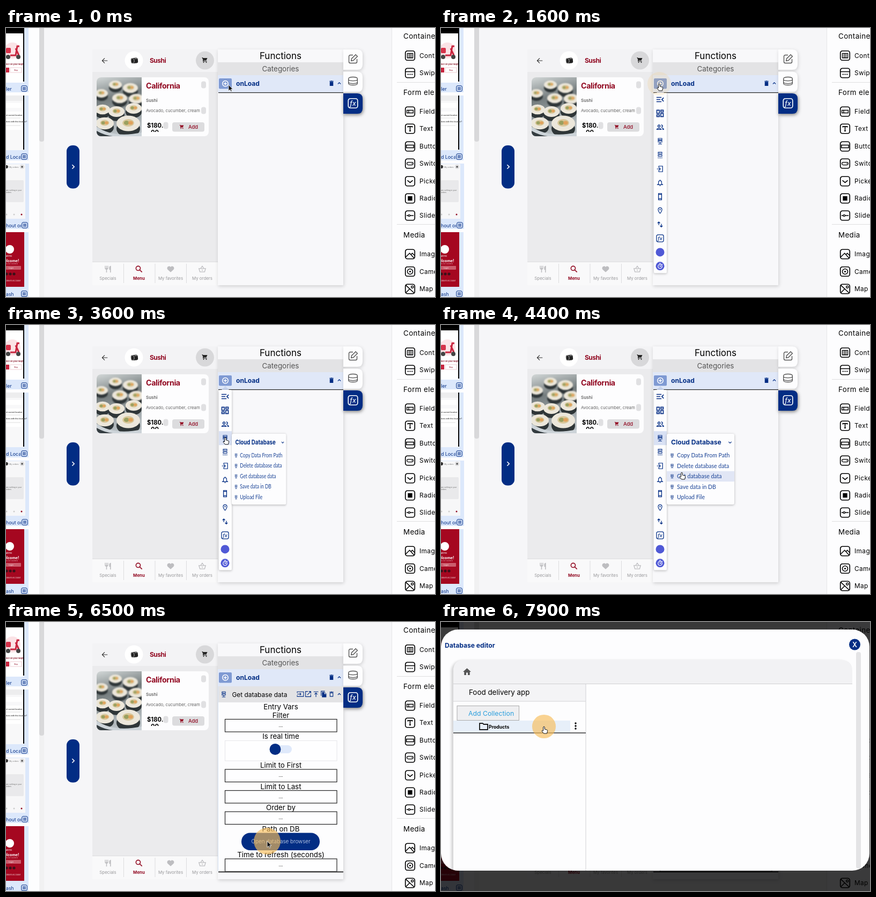
An HTML page for the animation above (8 s loop, 800 px wide and 502 px high).

```html
<!DOCTYPE html>
<html lang="en">
<head>
<meta charset="utf-8">
<title>Function editor</title>
<style>
html, body { margin: 0; width: 100%; height: 100%; overflow: hidden; background: #f6f6f8; }
svg { display: block; font-family: Inter, "Open Sans", sans-serif; }
.soft { filter: drop-shadow(0 1px 2px rgba(0,0,0,.28)); }
.side { filter: drop-shadow(1px 2px 3px rgba(0,0,0,.16)); }
.deep { filter: drop-shadow(1px 2px 3px rgba(0,0,0,.5)); }
.left { filter: drop-shadow(-4px 1px 2px rgba(0,0,0,.16)); }
.blur { filter: blur(1px); }
</style>
</head>
<body>
<svg id="stage" width="800" height="502" viewBox="0 0 800 502"></svg>
<script>
const NAVY = '#022d84', RED = '#920a22', INK = '#000', GREY = '#bdbdc0';
const LOOP = 8000;

// 24-unit icons: [path, stroke width]; no width means filled
const ICON = {
  back: ['M21 12H4M12 4l-8 8 8 8', 2],
  trash: ['M6 7h12v14H6zM5 4h4l1-1h4l1 1h4v2H5z'],
  bin: ['M7 8h10v12H7zM5 5h14M10 4h4', 2],
  up: ['M5 16l7-7 7 7', 3],
  down: ['M5 9l7 7 7-7', 3],
  right: ['M9 5l7 7-7 7', 3],
  cart: ['M1 2h3l1 2h16l-4 9H8l-1 2h12v2H6a2 2 0 0 1-2-3l1-2L2 4H1zM5 20a2 2 0 1 1 4 0a2 2 0 1 1-4 0M15 20a2 2 0 1 1 4 0a2 2 0 1 1-4 0'],
  heart: ['M12 21L4 14C-1 9 3 3 7.500 3C9.500 3 11 4 12 5.500C13 4 14.500 3 16.500 3C21 3 25 9 20 14z'],
  fork: ['M3 2h2v7h2V2h2v7h2V2h2v7c0 2-1.500 4-3.800 4v9H6.800v-9C4.500 13 3 11 3 9zM16 6q1-4 5-4v20h-2.500v-8H16z'],
  search: ['M3 9.500a6.500 6.500 0 1 0 13 0a6.500 6.500 0 1 0-13 0M14 14l7 7', 2.6],
  basket: ['M2 10h20l-3 10H5zM7 10l5-7 5 7M12 13v4', 2],
  home: ['M10 20v-6h4v6h5v-8h3L12 3 2 12h3v8z'],
  folder: ['M3 5h7l2 2h9v12H3z', 2],
  pencil: ['M12 3H6a3 3 0 0 0-3 3v12a3 3 0 0 0 3 3h12a3 3 0 0 0 3-3v-6M8 16l1-5 9-9 4 4-9 9z', 1.7],
  disks: ['M2 7q0-4 10-4t10 4v10q0 4-10 4t-10-4zM2 8q0 3.500 10 3.500t10-3.500M2 14q0 3.500 10 3.500t10-3.500', 1.6],
  box: ['M6 1.500h12a4.500 4.500 0 0 1 4.500 4.500v12a4.500 4.500 0 0 1-4.500 4.500H6a4.500 4.500 0 0 1-4.500-4.500V6A4.500 4.500 0 0 1 6 1.500z', 2],
  list: ['M6 8h12M6 12h12M6 16h12', 2.2],
  plus: ['M3 12a9 9 0 1 0 18 0a9 9 0 1 0-18 0M12 7v10M7 12h10', 2.6],
  menu: ['M2 6h14M2 12h11M2 18h14M22 7l-5 5 5 5', 2.4],
  grid: ['M3 3h7v9H3zM14 3h7v5h-7zM14 12h7v9h-7zM3 16h7v5H3z', 2.4],
  people: ['M6 8.500a3 3 0 1 0 6 0a3 3 0 1 0-6 0M3 18q0-3 6-3t6 3zM15 5.500q4 0 4 3t-4 3M17 14q5 1 5 4h-4', 2],
  server: ['M6 3h12v5H6zM6 10h12v5H6zM12 15v6M6 21h12M9 5.500h1M9 12.500h1', 1.8],
  server2: ['M6 3h12v5H6zM6 11h12v5H6zM5 21h3M10 21h4M16 21h3M9 5.500h1M9 13.500h1', 1.8],
  enter: ['M8 8V3h12v18H8v-5M2 12h10M9 8l4 4-4 4', 2.1],
  bell: ['M4 18h16l-3-3v-5q0-5-5-5t-5 5v5zM10 21h4M12 2v3', 2],
  phone: ['M7 2h10v20H7zM7 5h10M7 18h10', 2.2],
  pin: ['M12 21C8 16 6 12 6 9a6 6 0 0 1 12 0c0 3-2 7-6 12zM11 9a1 1 0 1 0 2 0a1 1 0 1 0-2 0', 2],
  swap: ['M8 14V4M4 8l4-4 4 4M16 10v10M12 16l4 4 4-4', 2.2],
  clock: ['M6 13a6 6 0 1 0 12 0a6 6 0 1 0-12 0M12 10v3h3M10 4h4M17 6l2 2', 2],
  insert: ['M1 8V4h22v16H1v-4M1 12h13M10 8l4 4-4 4', 2],
  open: ['M11 3H3v18h18v-8M14 3h7v7M21 3L9 15', 2],
  top: ['M4 4h16M12 22V8M7 13l5-5 5 5', 2],
  copy: ['M2 1h14v2H4v15H2zM6 5h9l6 6v12H6zM14 6v6h6z'],
  container: ['M6 7h12v10H6zM10 7v10M14 7v10', 1.7],
  swiper: ['M2 9h20M6 15h3M10.500 15h3M15 15h3', 1.7],
  field: ['M5 9h14v6H5zM9 9v6', 1.6],
  text: ['M7 9V7h10v2M12 7v10M10 17h4', 1.9],
  button: ['M4 9h16v6H4z', 1.7],
  toggle: ['M8 9h8a3 3 0 0 1 0 6H8a3 3 0 0 1 0-6zM15 12h2', 1.5],
  picker: ['M6 10l6 5 6-5', 2],
  radio: ['M7 7h10v10H7z'],
  slider: ['M4 12h4M12 12h8M8 12a2 2 0 1 0 4 0a2 2 0 1 0-4 0', 1.6],
  image: ['M2 19l9-9 10 11M14 13l3-3 5 5', 1.8],
  camera: ['M6 12a6 6 0 1 0 12 0a6 6 0 1 0-12 0M11 12a1 1 0 1 0 2 0a1 1 0 1 0-2 0', 1.8],
  map: ['M3 4l18 17M3 20l8-8M17 5a2.500 2.500 0 1 0 .1 0', 1.8]
};

const icon = (name, x, y, size, color = NAVY) => {
  const [d, w] = ICON[name];
  const paint = w ? `fill="none" stroke="${color}" stroke-width="${w}"` : `fill="${color}" fill-rule="evenodd"`;
  return `<path d="${d}" ${paint} transform="translate(${x - size / 2} ${y - size / 2}) scale(${size / 24})"/>`;
};
const box = (x, y, x2, y2, fill, more = '') =>
  `<rect x="${x}" y="${y}" width="${x2 - x}" height="${y2 - y}" fill="${fill}" ${more}/>`;
const dot = (x, y, r, fill, more = '') => `<circle cx="${x}" cy="${y}" r="${r}" fill="${fill}" ${more}/>`;
const oval = (x, y, rx, ry, fill, more = '') =>
  `<ellipse cx="${x}" cy="${y}" rx="${rx}" ry="${ry}" fill="${fill}" ${more}/>`;
const line = (x, y, x2, y2, color, w = 1) =>
  `<path d="M${x} ${y}L${x2} ${y2}" stroke="${color}" stroke-width="${w}"/>`;
const text = (x, y, size, s, fill = INK, more = '') =>
  `<text x="${x}" y="${y}" font-size="${size}" fill="${fill}" ${more}>${s}</text>`;
const BOLD = 'font-weight="700"', MID = 'text-anchor="middle"', WIDE = 'letter-spacing=".42"';
const fx = (x, y, size, color) => icon('box', x, y, size, color) +
  text(x, y + size * .2, size * .6, 'fx', color, MID + ' font-style="italic" font-weight="500"');

function thumbs() {
  const tile = (y, y2, label, iconX = 34) => box(0, y, iconX + 8, y2, '#dce8fb') +
    text(0, y2 - 3, 8.8, label, NAVY) + box(iconX - 7, y2 - 15, iconX + 8, y2, '#dce8fb') +
    icon('box', iconX, y2 - 7, 12) + icon('list', iconX, y2 - 7, 12);
  return box(0, 0, 62, 502, '#fdfdfe') + box(62, 0, 71, 502, '#f1f1f2') +
    box(62, -10, 71, 212, '#d8d8da', 'rx="4"') +
    tile(-5, 120, 'ler') + box(0, 0, 34, 102, '#fff') + box(0, 0, 34, 10, INK) + box(32, 0, 34, 100, INK) +
    dot(12, 42, 15, '#fbe3e6') + box(0, 37, 9, 47, '#d6324a', 'rx="2"') +
    `<path d="M8 51h10l3-17h4M18 38l6 13" fill="none" stroke="#c8253f" stroke-width="3"/>` +
    dot(4, 54, 4, '#444') + dot(23, 54, 4, '#444') +
    text(0, 69, 4, 'ver on your way!', '#8f2436', BOLD) + box(0, 74, 6, 83, '#c8253f') +
    box(8, 74, 29, 83, '#fff', 'stroke="#e8b8c0" stroke-width=".7"') + text(15, 80, 3.5, 'Skip', RED) +
    tile(126, 247, 'd Locati') + box(0, 126, 34, 228, '#f8f8f9') + box(0, 126, 32, 136, '#ededee') +
    box(32, 126, 34, 227, INK) + box(0, 140, 29, 149, '#fff') + box(0, 156, 29, 190, '#fff') +
    text(0, 164, 3.4, 'ct current location', '#555', BOLD) + line(0, 168, 27, 168, '#ddd') +
    text(0, 176, 3.4, 'tions with this location?', '#555', BOLD) + line(0, 182, 27, 182, '#ddd') +
    tile(253, 375, 'hout or', 35) + box(0, 254, 36, 356, '#f7f7f8') + dot(1, 259, 3, '#333') +
    text(6, 261, 3.6, 'My orders', '#777') + dot(30, 259, 4, '#dadadc') + dot(30, 259, 1.5, '#333') +
    box(0, 284, 33, 325, '#e9e9eb', 'rx="2"') + text(0, 304, 3.3, 'are nothing in your', '#666') +
    text(0, 308, 3.3, 'orders', '#666') + [1, 15, 29].map(x => dot(x, 348, 1.5, x > 20 ? RED : '#ccc')).join('') +
    tile(381, 503, 'ash') + box(0, 381, 34, 483, '#a50720') + dot(7, 413, 8, '#fff') +
    text(-6, 427, 4, 'mealtime', '#fff') + text(-10, 437, 7, 'Welcome!', '#fff', BOLD) +
    text(0, 441, 2.6, 'to your customers', '#f3c9cf') + box(0, 444, 28, 451, '#cb5c6c', 'rx="1"') +
    text(5, 449, 3.2, 'Log in', '#fff') + [0, 7, 14].map(x => dot(x + 1, 459, 2.6, '#3a1018')).join('') +
    text(0, 473, 3, 'CREATE ACCOUNT', '#fff');
}

function photo() {
  const back = [[178, 122, 12], [204, 106, 12], [232, 112, 14], [212, 131, 14], [243, 132, 14]];
  const front = [[180, 152, 14], [206, 156, 15], [238, 150, 15], [184, 178, 17], [228, 178, 22]];
  const roll = ([x, y, r]) => oval(x, y + r * .45, r, r * .72, '#2f3638') + oval(x, y, r, r * .66, '#ece7db') +
    oval(x, y - 1, r * .5, r * .32, '#d8c79a') + oval(x - r * .15, y - 1, r * .22, r * .18, '#9aa060') +
    oval(x + r * .2, y - 1, r * .2, r * .16, '#e0a25c');
  return `<clipPath id="shot"><path d="M177 92H253V202H177a8 8 0 0 1-8-8V100a8 8 0 0 1 8-8z"/></clipPath>` +
    `<linearGradient id="tone" x2=".2" y2="1"><stop stop-color="#d3d8d8"/><stop offset=".4" stop-color="#757d7e"/>` +
    `<stop offset="1" stop-color="#b9c0c4"/></linearGradient><g clip-path="url(#shot)">` +
    box(169, 92, 253, 202, 'url(#tone)') + `<g class="blur">${back.map(roll).join('')}</g>` +
    front.map(roll).join('') +
    `<path d="M169 184Q200 206 253 195V202H169z" fill="#ccd3d8"/><path d="M169 192q14 8 30 10H169z" fill="#343c40"/></g>`;
}

function phone() {
  const tabs = [['fork', 190, 'Specials'], ['search', 248, 'Menu'], ['heart', 307, 'My favorites'], ['basket', 366, 'My orders']];
  const pill = (x, y) => box(x - 4.500, y - 6.500, x + 4.500, y + 6.500, '#e0e0e2', 'rx="4"');
  return box(161, 40, 395, 480, '#ebebed') + box(161, 40, 395, 82, '#f3f3f5') +
    icon('back', 184, 61, 14, '#333') + dot(238.5, 60.5, 17, '#fff') +
    `<g transform="rotate(-6 239 61)">${box(233, 56, 246, 66, '#222', 'rx="3"')}${oval(236, 61, 3, 4.5, '#222', 'stroke="#ccc" stroke-width=".8"')}` +
    `${line(240, 57.5, 246, 57.5, '#ccc', .8)}</g>` +
    text(268, 65, 12, 'Sushi', RED, BOLD + ' letter-spacing="-.5"') + dot(371, 60.5, 17, '#d8d8da') +
    icon('cart', 371, 60, 12, '#222') + box(169, 92, 378, 202, '#fdfdfe', 'rx="8"') + photo() +
    text(261, 113, 14.2, 'California', RED, BOLD + ' letter-spacing="-.35"') +
    text(261, 138, 8, 'Sushi', '#666', 'font-weight="600"') +
    text(261, 156.5, 7.8, 'Avocado, cucumber, cream', '#666') +
    pill(368.5, 106) + pill(368.5, 154) + pill(298, 182) + text(263, 186, 11.2, '$180.', INK, BOLD) +
    `<clipPath id="cut"><rect x="260" y="189" width="40" height="5"/></clipPath><g clip-path="url(#cut)">` +
    text(270, 199, 11.2, '00', INK, BOLD) + '</g>' +
    box(310, 176, 370, 193.5, '#dcdcde', 'rx="4"') + icon('cart', 328, 184.5, 9, RED) +
    text(340, 188, 9.4, 'Add', RED, 'font-weight="500"') +
    box(161, 436, 395, 480, '#f9f9fa') + line(161, 436.5, 395, 436.5, '#dcdcde') +
    [219.5, 278, 336.5].map(x => line(x, 440, x, 476, '#dcdcde')).join('') +
    tabs.map(([name, x, s]) => {
      const on = name === 'search';
      return icon(name, x, 450, 15, on ? RED : GREY) +
        text(x, 470, 7.9, s, on ? RED : '#98989b', MID + (on ? ' ' + BOLD : ''));
    }).join('');
}

function palette() {
  const rows = [[51.5, 'container', 'Container'], [84, 'swiper', 'Swiper'], [156, 'field', 'Field'], [188, 'text', 'Text'],
    [221, 'button', 'Button'], [253, 'toggle', 'Switch'], [286, 'picker', 'Picker'], [318, 'radio', 'Radio'],
    [350, 'slider', 'Slider'], [422, 'image', 'Image'], [454.5, 'camera', 'Camera'], [487, 'map', 'Map']];
  const head = (y, s) => text(741, y, 13.3, s, INK, WIDE);
  return box(719, 0, 720, 502, '#e6e6e8') + box(720, 0, 800, 502, '#fdfdfe') +
    line(729, 101.5, 800, 101.5, '#dedee0') + line(729, 366.5, 800, 366.5, '#dedee0') +
    head(20, 'Containers') + head(124.5, 'Form elements') + head(391, 'Media') +
    rows.map(([y, name, s]) => icon('box', 753.5, y, 20, INK) + icon(name, 753.5, y, 20, INK) +
      text(771, y + 4, 11.8, s, INK, WIDE)).join('');
}

function panel() {
  const tab = (y, fill, shade) =>
    `<path class="${shade}" d="M629 ${y}h26q10 0 10 10v18q0 10-10 10h-26z" fill="${fill}"/>`;
  return `<g class="side">${box(395, 40, 629, 480, '#f8f8fa')}</g>` +
    text(512, 57.5, 17, 'Functions', INK, MID) + box(395, 64, 629, 88, '#e3e3e5') +
    text(512, 80.5, 13.4, 'Categories', '#555', MID) + box(395, 88, 629, 120, '#e0e8f8') +
    box(397, 94, 421, 113.5, '#7f9ad3', 'rx="2"') +
    icon('plus', 409, 103.8, 14, '#fff') + text(429, 108.3, 12.1, 'onLoad', NAVY, BOLD) +
    icon('trash', 607, 103, 13) + icon('up', 621.5, 103, 9) +
    tab(40, '#fdfdfe', 'side') + tab(81.5, '#fdfdfe', 'side') + tab(122, NAVY, 'deep') +
    icon('pencil', 647, 58, 20, '#555') + icon('disks', 647, 99, 20, '#555') + fx(647, 140.5, 20, '#fff') +
    box(113, 219, 137, 299.5, NAVY, 'rx="11"') + icon('right', 125, 259, 13, '#fff');
}

function form() {
  const label = (y, s) => text(512.5, y, 13.3, s, INK, MID);
  const input = y => box(408.5, y, 617, y + 23.5, '#fefeff', 'stroke="#222" stroke-width="1.2"') +
    text(512.5, y + 14, 9, '...', INK, MID);
  return box(395, 120, 629, 150, '#e3e3e5') + icon('server', 406, 135, 13) + box(395, 150, 629, 466, '#fdfdfe') +
    line(395.5, 121, 395.5, 466, '#d5e2f5') + label(163, 'Entry Vars') + label(178.5, 'Filter') + input(181.5) +
    label(218, 'Is real time') + box(408.5, 221.5, 617, 259, '#fefeff', 'stroke="#e6e6e9"') +
    box(497, 230, 533, 245, '#dfe9fb', 'rx="7.500"') + dot(502, 237.5, 10.5, NAVY) +
    label(271.5, 'Limit to First') + input(275) + label(311.5, 'Limit to Last') + input(314.5) +
    label(351, 'Order by') + input(354) + label(390.5, 'Path on DB') + box(439, 393.5, 585, 426, NAVY, 'rx="16"') +
    text(512.5, 413, 9.9, 'Open database browser', '#dfe6f7', MID + ' font-weight="300"') +
    label(438.5, 'Time to refresh (seconds)') + input(442);
}

function entry() {
  const tools = ['insert', 'open', 'top', 'copy', 'bin'];
  return `<g id="entry"><clipPath id="fold"><rect id="foldBox" x="395" y="120" width="234"/></clipPath>` +
    box(395, 120, 629, 151, '#fdfdfe') +
    `<g id="form" clip-path="url(#fold)">${form()}</g>` + text(421.5, 139.5, 11.9, 'Get database data') +
    tools.map((name, i) => icon(name, 549 + i * 14.500, 134.5, 13)).join('') +
    `<g id="shut">${icon('down', 621.5, 134.5, 9)}</g><g id="wide">${icon('up', 621.5, 134.5, 9)}</g></g>` +
    `<rect id="rule" x="396" width="233" fill="#222"/>`;
}

const rowY = i => 133.5 + i * 25.9;
function submenu(id, top, title, items) {
  const h = 54 + (items.length - 1) * 19.5;
  return `<g id="${id}"><g class="soft">${box(421, top, 547, top + h, '#fdfdfe', 'rx="3"')}</g>` +
    `<rect id="${id}Hover" x="421" width="126" height="19.500" fill="#e1e6f5"/>` +
    text(429, top + 20.3, 12.1, title, NAVY, BOLD) + icon('down', 539, top + 16, 9) +
    items.map((s, i) => icon('server', 431, top + 40.5 + i * 19.5, 9) +
      text(440, top + 44 + i * 19.5, 10.5, s, '#1a4396', 'font-family="Lato, sans-serif"')).join('') + '</g>';
}

function menu() {
  const names = ['menu', 'grid', 'people', 'server', 'server2', 'enter', 'bell', 'phone', 'pin', 'swap'];
  return `<g id="menu"><path d="M402 121l7-7 7 7z" fill="#c9d5ee"/><g class="soft">${box(397, 121, 421, 457.5, '#fdfdfe', 'rx="2"')}</g>` +
    `<rect id="mark" x="397" width="24" height="26" fill="#d9e1f4"/>` +
    names.map((name, i) => icon(name, 408.5, rowY(i), i < 3 ? 16 : 14)).join('') + fx(408.5, rowY(10), 15, NAVY) +
    dot(408.5, rowY(11), 8, '#5059d6') + dot(408.5, rowY(12), 8, '#5059d6') + icon('clock', 408.5, rowY(12), 15, '#fff') +
    submenu('nav', 126, 'Navigation', ['Go to home screen', 'Go to screen', 'Go to previous']) +
    submenu('cloud', 203, 'Cloud Database', ['Copy Data From Path', 'Delete database data', 'Get database data', 'Save data in DB', 'Upload File']) +
    '</g>';
}

function modal() {
  return `<g id="modal">${box(0, 0, 800, 502, '#000', 'opacity=".77"')}` +
    `<clipPath id="sheet"><rect y="14" width="799" height="450" rx="32"/></clipPath>` +
    box(0, 14, 799, 464, '#fdfdfe', 'rx="32"') + '<g clip-path="url(#sheet)">' +
    text(7, 47.7, 12.1, 'Database editor', NAVY, BOLD) + dot(771.5, 42, 10.5, NAVY) +
    text(771.5, 46.5, 12.5, 'X', '#fff', MID + ' font-weight="600"') + box(774, 56, 783, 460, '#e4e4e6', 'rx="4"') +
    `<g class="left">${box(23, 71, 767, 490, '#fdfdfe', 'rx="20"')}</g>` +
    `<path d="M23 115V91q0-20 20-20H747q20 0 20 20v24z" fill="#f2f2f4"/>` + line(23, 115.5, 767, 115.5, '#cfcfd2') +
    icon('home', 48.5, 93, 18, '#555') + box(23, 116, 270, 148, '#f4f4f6') + line(23, 148, 270, 148, '#d2d2d5') +
    line(270, 116, 270, 464, '#d2d2d5') + text(52, 136, 13.4, 'Food delivery app') + '<g id="data">' +
    box(30, 156.5, 145.5, 183.5, '#efeff1', 'stroke="#aaa"') + text(51, 175.3, 12.3, 'Add Collection', '#2b9fdd') +
    `<rect id="folderRow" x="23" y="184" width="218" height="23" fill="#e7eff9"/>` + line(23, 207, 270, 207, '#333', 1.3) +
    icon('folder', 79.5, 195, 20, INK) + text(89, 198.5, 8.7, 'Products', INK, BOLD) +
    [189, 194, 199].map(y => dot(251, y, 1.7, INK)).join('') + '</g></g></g>';
}

const pointer = '<circle id="ring" fill="#f8be5a"/><g id="tip">' +
  '<path id="arrow" d="M0 0V11.500L2.700 9 4.500 12.800 6.300 12 4.600 8.300H8z" fill="#111" stroke="#fff" stroke-width=".8"/>' +
  '<path id="hand" d="M-1.300 1Q0-1 1.300 1V5l4.500 1.300Q7 6.800 6.600 8.500L5.500 13H-.5L-4 8.500Q-4 6.500-1.300 8z" fill="#fff" stroke="#111" stroke-width="1"/></g>';

document.getElementById('stage').innerHTML = box(0, 0, 800, 502, '#f6f6f8') + thumbs() + palette() + phone() +
  panel() + entry() + menu() + modal() + pointer;

const el = id => document.getElementById(id);
const set = (id, attrs) => { for (const k in attrs) el(id).setAttribute(k, attrs[k]); };
const show = (id, on) => set(id, { visibility: on ? 'visible' : 'hidden' });
const ramp = (t, a, b) => Math.max(0, Math.min(1, (t - a) / (b - a)));
const smooth = p => p * p * (3 - 2 * p);

// time, x, y of the pointer tip
const PATH = [[0, 415, 106], [500, 415, 106], [1000, 407, 104], [2500, 407, 104], [3100, 407, 166], [3500, 408, 209],
  [3850, 413, 213], [4350, 449, 275], [4700, 449, 275], [5000, 450, 279], [5150, 450, 279], [5550, 621, 136],
  [5750, 621, 136], [6200, 487, 409], [7150, 487, 409], [7800, 192, 195], [8000, 192, 195]];
const CLICKS = [1260, 4680, 5560, 6400, 7850];

function pointerAt(t) {
  const i = PATH.findIndex(p => p[0] > t), a = PATH[i - 1], b = PATH[i];
  const p = smooth(ramp(t, a[0], b[0]));
  return [a[1] + (b[1] - a[1]) * p, a[2] + (b[2] - a[2]) * p];
}

function hover(id, top, count, x, y) {
  const i = Math.floor((y - top - 30.7) / 19.5);
  const on = x > 421 && i >= 0 && i < count;
  set(id + 'Hover', { y: top + 30.7 + i * 19.5, opacity: on ? 1 : 0 });
}

function draw(t) {
  const [x, y] = pointerAt(t);
  const hand = (t > 800 && t < 5250) || (t > 5450 && t < 5850) || t > 7600;
  set('tip', { transform: `translate(${x} ${y})` });
  set('hand', { opacity: hand ? 1 : 0 });
  set('arrow', { opacity: hand ? 0 : 1 });

  const age = t - (CLICKS.filter(c => c <= t).pop() ?? -LOOP);
  const fade = ramp(age, 220, 380);
  set('ring', { cx: x, cy: y, r: 19 + 6 * ramp(age, 0, 100) - 4 * fade, opacity: .65 * (1 - fade) });

  const tall = ramp(t, 1330, 1530) * (1 - ramp(t, 5000, 5400) ** 2.5);
  set('menu', { transform: `translate(0 118) scale(1 ${tall}) translate(0 -118)`, opacity: tall > 0 ? 1 : 0 });
  const row = t < 2950 ? -1 : t < 3220 ? 0 : t < 3310 ? 1 : t < 3420 ? 2 : 3;
  set('mark', { y: rowY(row) - 13, opacity: row < 0 ? 0 : 1 });
  const grow = (id, p) => set(id, { transform: `translate(421 0) scale(${p} 1) translate(-421 0)`, opacity: p > 0 ? 1 : 0 });
  grow('nav', t < 3240 ? ramp(t, 3062, 3262) : 0);
  grow('cloud', ramp(t, 3440, 3640));
  hover('nav', 126, 3, x, y);
  hover('cloud', 203, 5, x, y);

  // the dark rule closes the block: heading, then row, then open form
  const added = t >= 4850;
  const open = smooth(ramp(t, 5640, 5900));
  const bottom = added ? 151 + 314.5 * open : 120;
  show('entry', added);
  set('form', { opacity: open > 0 ? 1 : 0 });
  set('foldBox', { height: bottom - 120 });
  set('rule', { y: bottom, height: added ? 1.8 : 1.2 });
  set('shut', { opacity: open > 0 ? 0 : 1 });
  set('wide', { opacity: open > 0 ? 1 : 0 });

  set('modal', { opacity: smooth(ramp(t, 6520, 6880)) });
  show('data', t >= 7200);
  set('folderRow', { opacity: x < 241 && y < 207 ? 1 : 0 });
}

const start = performance.now();
function tick() {
  draw((performance.now() - start) % LOOP);
  requestAnimationFrame(tick);
}
tick();
</script>
</body>
</html>
```
